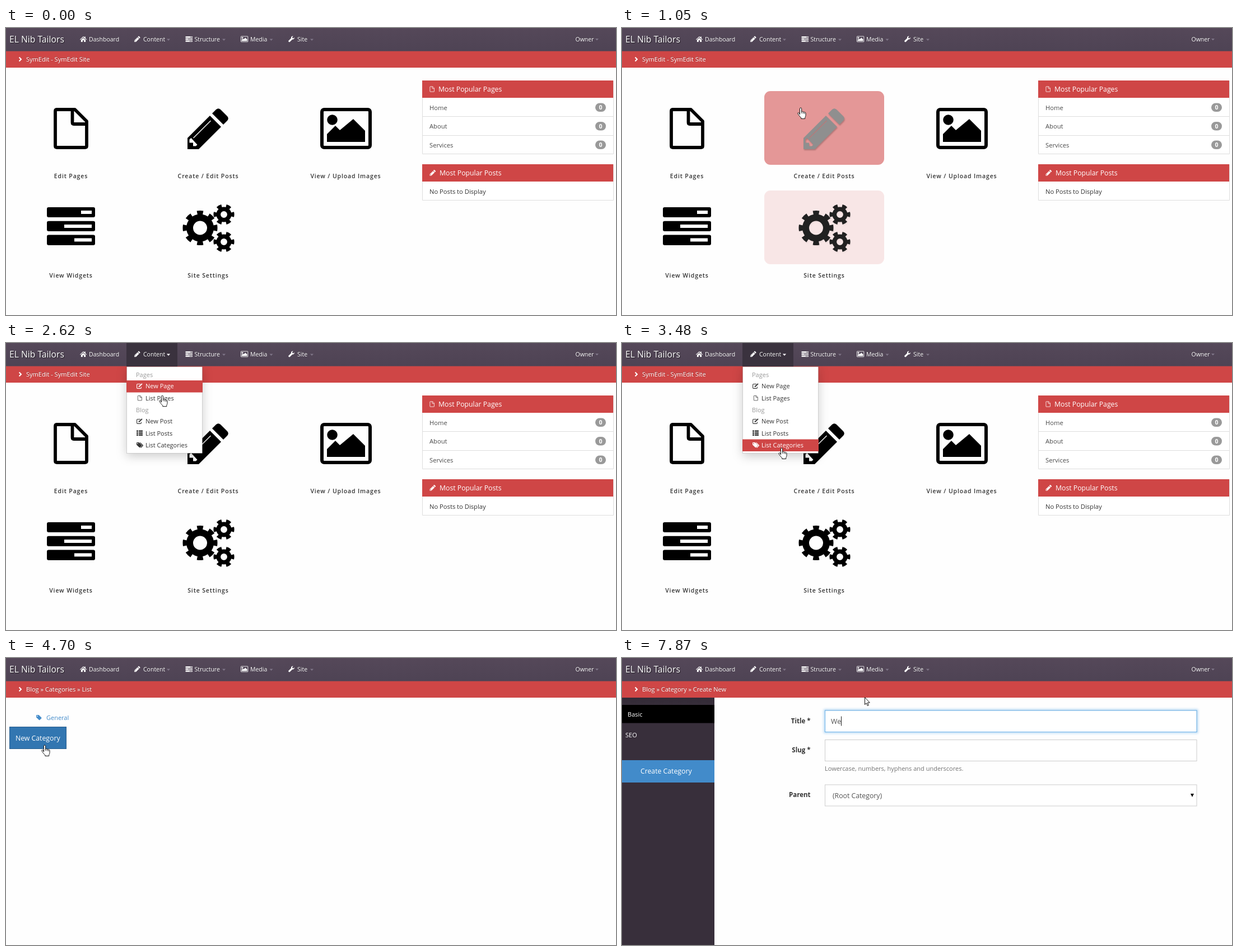
Recreate the animation shown at these times as an HTML page. Size 1089x514 px, loop 8 s.

```html
<!DOCTYPE html>
<html lang="en">
<head>
<meta charset="utf-8">
<title>Dashboard</title>
<style>
@property --h { syntax: '<number>'; inherits: true; initial-value: 0; }
html, body { margin: 0; width: 100%; height: 100%; overflow: hidden; background: #fefefe; }
svg { display: block; width: 1089px; height: 514px; }
text { font: 11px 'Open Sans', sans-serif; fill: currentColor; white-space: pre; }
.ico { fill: currentColor; stroke: none; }
.line { fill: none; stroke: currentColor; stroke-linejoin: round; }
.white { color: #fff; }
.nav text { font-size: 10.5px; }
.nav text, .bar text { text-shadow: 0 -1px 0 rgba(0,0,0,.3); }
.nav .brand { font-size: 15.7px; text-shadow: 1px 1px 1px rgba(0,0,0,.6); }
.big { font-size: 12.25px; }
.row { font-size: 11.2px; fill: #4a4a4a; }
.badge { font-size: 10.5px; font-weight: 700; }
.label { font-size: 10.5px; font-weight: 600; letter-spacing: .87px; fill: #333; text-anchor: middle; }
.field { font-size: 11.5px; font-weight: 700; fill: #333; text-anchor: end; }
.mute { color: #999; }
.box { fill: #fff; stroke: #ccc; }

/* 1% of the loop is 80 ms */
.home, .list, .form, .menu, .hot, .hand, .arrow, .beam, .over, .press, .focus, .caret, .w, .e {
  animation: 8s step-end infinite;
}
.home { animation-name: home; }
.list { animation-name: list; }
.form { animation-name: form; }
.menu { animation-name: menu; }
.hot { animation-name: hot; }
.hand { animation-name: hand; }
.arrow { animation-name: arrow; }
.beam { animation-name: beam; }
.over { animation-name: over; }
.press { animation-name: press; }
.focus { animation-name: focus; }
.caret { animation-name: caret; }
.w { animation-name: w; }
.e { animation-name: e; }
.cursor { animation: move 8s linear infinite; }
.posts { animation: posts 8s linear infinite; }
.settings { animation: settings 8s linear infinite; }
.tile rect.bg { fill: #cf4646; opacity: var(--h); }
.tile .glyph {
  color: color-mix(in srgb, #fff calc(var(--h) * 100%), #000);
  filter: drop-shadow(1px 2px 1px rgb(0 0 0 / calc(var(--h) * .4)));
}
.drop { fill: #fff; stroke: rgba(0,0,0,.15); filter: drop-shadow(0 5px 9px rgba(0,0,0,.2)); }

@keyframes home { 0% { opacity: 1; } 44.25% { opacity: 0; } }
@keyframes list { 0% { opacity: 0; } 44.25% { opacity: 1; } 71.125% { opacity: 0; } }
@keyframes form { 0% { opacity: 0; } 71.125% { opacity: 1; } }
@keyframes menu { 0% { opacity: 0; } 26% { opacity: 1; } 44.25% { opacity: 0; } }
@keyframes hot {
  0% { transform: translateY(-100px); }
  32.375% { transform: translateY(67px); }
  33.25% { transform: translateY(88.5px); }
  34.625% { transform: translateY(-100px); }
  36.125% { transform: translateY(129.5px); }
  37.625% { transform: translateY(151px); }
  39.125% { transform: translateY(172.5px); }
}
@keyframes posts {
  0%, 11.5% { --h: 0; } 13.125% { --h: .56; } 15.25%, 15.625% { --h: 1; }
  18.5% { --h: .13; } 20%, 100% { --h: 0; }
}
@keyframes settings {
  0%, 8.625% { --h: 0; } 10.75% { --h: .68; } 13.125% { --h: .13; } 14.25%, 100% { --h: 0; }
}
@keyframes move {
  0%, 7.625% { transform: translate(326px, 486px); }
  13.125% { transform: translate(319px, 143px); }
  15.625% { transform: translate(312px, 115px); }
  17% { transform: translate(292px, 56px); }
  18.5% { transform: translate(277px, 38px); }
  20% { transform: translate(277px, 20px); }
  20.625%, 29.875% { transform: translate(277px, 24px); }
  32.75% { transform: translate(279px, 94px); }
  39.625% { transform: translate(285px, 188px); }
  52.125% { transform: translate(285px, 188px); animation-timing-function: ease-in-out; }
  58.75% { transform: translate(69px, 156px); }
  71.75% { transform: translate(69px, 156px); animation-timing-function: ease-in-out; }
  79%, 83% { transform: translate(430px, 112px); }
  86%, 100% { transform: translate(433px, 70px); }
}
@keyframes hand {
  0% { opacity: 0; } 8.75% { opacity: 1; } 10.75% { opacity: 0; } 11.5% { opacity: 1; }
  15.7% { opacity: 0; } 18.2% { opacity: 1; } 50.25% { opacity: 0; }
  57% { opacity: 1; } 72.4% { opacity: 0; }
}
@keyframes arrow {
  0% { opacity: 0; } 7.625% { opacity: 1; } 8.75% { opacity: 0; } 10.75% { opacity: 1; }
  11.5% { opacity: 0; } 15.7% { opacity: 1; } 18.2% { opacity: 0; } 50.25% { opacity: 1; }
  57% { opacity: 0; } 72.4% { opacity: 1; } 77.4% { opacity: 0; } 84.5% { opacity: 1; }
}
@keyframes beam { 0% { opacity: 0; } 77.4% { opacity: 1; } 84.5% { opacity: 0; } }
@keyframes over { 0% { opacity: 0; } 57% { opacity: 1; } }
@keyframes press { 0% { opacity: 0; } 67.375% { opacity: 1; } 68% { opacity: 0; } }
@keyframes focus { 0% { opacity: 0; } 82.25% { opacity: 1; } }
@keyframes caret {
  0% { opacity: 0; transform: none; }
  82.25% { opacity: 1; transform: none; }
  88.25% { opacity: 0; transform: none; }
  95.25% { opacity: 1; transform: translateX(11px); }
  98.375% { opacity: 1; transform: translateX(18px); }
}
@keyframes w { 0% { opacity: 0; } 95.25% { opacity: 1; } }
@keyframes e { 0% { opacity: 0; } 98.375% { opacity: 1; } }
</style>
</head>
<body>
<svg viewBox="0 0 1089 514">
<defs>
  <linearGradient id="navFill" x2="0" y2="1"><stop stop-color="#554859"/><stop offset="1" stop-color="#4e4354"/></linearGradient>
  <linearGradient id="sideFill" x2="0" y2="1"><stop stop-color="#332b37"/><stop offset=".04" stop-color="#382f3b"/></linearGradient>
  <clipPath id="row"><rect class="hot" x="215" width="136" height="21.5"/></clipPath>
  <filter id="glow" x="-5%" y="-50%" width="110%" height="200%"><feGaussianBlur stdDeviation="2"/></filter>

  <path id="caretDown" class="ico" d="M0 0h6l-3 3.2z"/>
  <path id="file" class="line" stroke-width="5.8" d="M33.5 3H6Q3 3 3 6V68Q3 71 6 71H56Q59 71 59 68V29H36Q33.5 29 33.5 26ZM33.5 3H38L59 24V29"/>
  <g id="pencil" class="ico">
    <path fill-rule="evenodd" d="M0 53 40 13 60 33 20 73H0ZM12.500 24.500 14.500 26.500 0 0ZM8 67.500 12.300 63 1 52 4 60V62H9V67.500Z" visibility="hidden"/>
    <path fill-rule="evenodd" d="M0 53 40 13 60 33 20 73H0ZM8 67 12 62.500 1 0ZM0 0Z" visibility="hidden"/>
    <path fill-rule="evenodd" d="M0 53 40 13 60 33 20 73H0ZM3.500 55.500V61.500H10V67.500H15L17.500 65 6.500 53ZM10 52.500 11 53.500 42 22.500 41 21.500Z"/>
    <path d="M44 9 51 2Q55-1.500 59 2L71 14Q74.500 18 71 22L64 29Z"/>
  </g>
  <g id="picture">
    <rect class="line" x="3" y="3" width="86" height="68" rx="4" stroke-width="6"/>
    <path class="ico" d="M12 61V47L27 32 35 40 59 20 80 41V61Z"/>
    <circle class="ico" cx="21.5" cy="21.5" r="9.3"/>
  </g>
  <path id="tasks" class="ico" fill-rule="evenodd" d="M3 0H83q3 0 3 3V15q0 3-3 3H3q-3 0-3-3V3q0-3 3-3ZM61 6V12H80V6ZM3 24.7H83q3 0 3 3V40q0 3-3 3H3q-3 0-3-3V27.7q0-3 3-3ZM31 31V37H80V31ZM3 49.5H83q3 0 3 3V65q0 3-3 3H3q-3 0-3-3V52.5q0-3 3-3ZM49 55.5V61.5H80V55.5Z"/>
  <g id="cog" class="line">
    <circle r="9.7" stroke-width="7.6"/>
    <circle r="15.3" stroke-width="6.5" pathLength="12" stroke-dasharray="1 1" stroke-dashoffset=".5"/>
  </g>
  <path id="house" class="ico" d="M0 5.5 6 0 8 1.8V.6H9.800V3.500L12 5.500 11.300 6.300 6 1.600.7 6.300ZM1.900 6.400 6 2.700 10.100 6.400V10H7.200V7H4.800V10H1.900Z"/>
  <path id="wrench" class="ico" d="M.4 8.300 5 3.700C4.600 1.500 6.300-.3 8.700.1L7 1.900 7.300 3.600 9 3.900 10.800 2.200C11.300 4.500 9.300 6.300 7.200 5.900L2.600 10.500C1.300 11.300-.5 9.600.4 8.300Z"/>
  <g id="edit"><path class="line" stroke-width="1.1" d="M7 1.500H2Q.6 1.500.6 3V8Q.6 9.400 2 9.400H7Q8.400 9.400 8.400 8V6.500"/><path class="line" stroke-width="1.9" d="M4 6.500 10 .9"/></g>
  <path id="rows" class="ico" d="M0 0H3V2.500H0ZM4 0H11V2.500H4ZM0 3.500H3V6H0ZM4 3.500H11V6H4ZM0 7H3V9.500H0ZM4 7H11V9.500H4Z"/>
  <path id="tag" class="ico" fill-rule="evenodd" d="M0 1Q0 0 1 0H4.500L9.300 4.800Q9.800 5.400 9.300 6L6.200 9Q5.600 9.500 5 9L0 4.300ZM2 1.200A.9.9 0 1 0 2.100 3 .9.9 0 0 0 2 1.200Z"/>
  <path id="chevron" class="line" stroke-width="2" d="M1 .5 4.500 4 1 7.500" style="stroke-linejoin:miter"/>

  <g id="items">
    <use href="#edit" x="233" y="72"/><text x="249" y="81">New Page</text>
    <use href="#file" transform="translate(235 94)scale(.125)"/><text x="249" y="103">List Pages</text>
    <use href="#edit" x="233" y="135"/><text x="249" y="144">New Post</text>
    <use href="#rows" x="233" y="156.5"/><text x="249" y="165.5">List Posts</text>
    <use href="#tag" x="233" y="178"/><path class="line" stroke-width="1.3" d="M239.5 178.400 244.400 183.500 240.500 187.500"/><text x="249" y="187">List Categories</text>
  </g>
</defs>

<rect width="1089" height="514" fill="#fefefe"/>
<rect y="41" width="1089" height="30" fill="#cf4646"/>

<g class="home">
  <g class="bar white"><text x="36" y="60">SymEdit - SymEdit Site</text></g>
  <use href="#file" x="85" y="143"/>
  <use href="#picture" x="561" y="143"/>
  <use href="#tasks" x="73" y="321"/>
  <g class="tile posts">
    <rect class="bg" x="254" y="113" width="214" height="132" rx="11"/>
    <g class="glyph"><use href="#pencil" x="324" y="144"/></g>
  </g>
  <g class="tile settings">
    <rect class="bg" x="254" y="291" width="214" height="132" rx="11"/>
    <g class="glyph">
      <g class="line" transform="translate(346.5 358)">
        <circle r="18.5" stroke-width="12"/>
        <circle r="27" stroke-width="8" pathLength="16" stroke-dasharray="1 1" stroke-dashoffset=".5"/>
      </g>
      <use href="#cog" x="389" y="334"/><use href="#cog" x="389" y="383"/>
    </g>
  </g>
  <text class="label" x="116" y="268.5">Edit Pages</text>
  <text class="label" x="361" y="268.5">Create / Edit Posts</text>
  <text class="label" x="606.5" y="268.5">View / Upload Images</text>
  <text class="label" x="116" y="446.5">View Widgets</text>
  <text class="label" x="361" y="446.5">Site Settings</text>

  <path fill="#fff" stroke="#ddd" d="M743.5 94.5H1084.5V225.5H743.5ZM743.5 158.5H1084.5M743.5 192.5H1084.5M743.5 244.5H1084.5V308.5H743.5Z"/>
  <path fill="#cf4646" d="M743 94H1084V125H743ZM743 244H1084V275H743Z"/>
  <g class="white">
    <use href="#file" transform="translate(756.5 104.5)scale(.135)"/><text class="big" x="772" y="114">Most Popular Pages</text>
    <use href="#pencil" transform="translate(756.5 254)scale(.145)"/><text class="big" x="774" y="263.5">Most Popular Posts</text>
  </g>
  <text class="row" x="756" y="146.5">Home</text>
  <text class="row" x="756" y="180">About</text>
  <text class="row" x="756" y="213.5">Services</text>
  <text class="row" x="756" y="297" style="fill:#333">No Posts to Display</text>
  <g fill="#999">
    <rect x="1052" y="134.5" width="19" height="15.5" rx="7.7"/>
    <rect x="1052" y="168" width="19" height="15.5" rx="7.7"/>
    <rect x="1052" y="201.5" width="19" height="15.5" rx="7.7"/>
  </g>
  <g class="white" text-anchor="middle">
    <text class="badge" x="1061.5" y="146">0</text>
    <text class="badge" x="1061.5" y="179.5">0</text>
    <text class="badge" x="1061.5" y="213">0</text>
  </g>
</g>

<g class="list">
  <g class="bar white"><text x="36" y="60">Blog » Categories » List</text></g>
  <g color="#428bca"><use href="#tag" x="54" y="102"/><text x="72" y="110.5">General</text></g>
  <rect x="6.5" y="123.5" width="101" height="39" fill="#428bca" stroke="#357ebd"/>
  <rect class="over" x="6.5" y="123.5" width="101" height="39" fill="#3276b1" stroke="#285e8e"/>
  <path class="press" d="M8 162V125H107" fill="none" stroke="#000" stroke-opacity=".2" stroke-width="3"/>
  <g class="white"><text class="big" x="17" y="147.5">New Category</text></g>
</g>

<g class="form">
  <g class="bar white"><text x="36" y="60">Blog » Category » Create New</text></g>
  <rect y="71" width="165" height="443" fill="url(#sideFill)"/>
  <rect y="84" width="165" height="32.5"/>
  <rect y="183" width="165" height="40" fill="#428bca"/>
  <g class="white">
    <text x="10" y="104.5">Basic</text>
    <text x="6" y="141.5">SEO</text>
    <text class="big" x="33" y="207">Create Category</text>
  </g>
  <text class="field" x="336.5" y="116.5">Title *</text>
  <text class="field" x="336.5" y="168.5">Slug *</text>
  <text class="field" x="336.5" y="249">Parent</text>
  <rect class="box" x="362.5" y="94" width="663.5" height="38.5"/>
  <rect class="box" x="362.5" y="146.5" width="663.5" height="38"/>
  <rect class="box" x="362.5" y="227" width="663.5" height="38"/>
  <g color="#737373"><text x="362" y="201.5">Lowercase, numbers, hyphens and underscores.</text></g>
  <g color="#555"><text class="big" x="376" y="251">(Root Category)</text></g>
  <path d="M1015 243H1021L1018 249Z"/>
  <g class="focus">
    <rect x="362" y="93.5" width="664.5" height="39.5" fill="none" stroke="#66afe9" stroke-width="3" opacity=".6" filter="url(#glow)"/>
    <rect class="box" x="362.5" y="94" width="663.5" height="38.5" style="stroke:#66afe9"/>
  </g>
  <g color="#555">
    <text class="big w" x="373" y="118">W</text>
    <text class="big e" x="384.3" y="118">e</text>
  </g>
  <rect class="caret" x="373" y="104.5" width="1" height="17" fill="#222"/>
</g>

<rect class="menu drop" x="215.5" y="42.5" width="135" height="155"/>

<rect width="1089" height="41.5" fill="url(#navFill)"/>
<rect class="menu" x="215" width="91" height="42" fill="#3a323e"/>
<g class="nav white">
  <text class="brand" x="6" y="25.5">EL Nib Tailors</text>
  <use href="#house" x="132" y="15"/><text x="148" y="24">Dashboard</text>
  <use href="#pencil" transform="translate(229 14.5)scale(.145)"/><text x="245" y="24">Content</text>
  <use href="#tasks" transform="translate(320.5 15)scale(.144)"/><text x="336.5" y="24">Structure</text>
  <use href="#picture" transform="translate(419 14.5)scale(.144)"/><text x="436" y="24">Media</text>
  <use href="#wrench" x="504" y="14.5"/><text x="520" y="24">Site</text>
  <text x="1016.5" y="23.5">Owner</text>
  <use href="#chevron" x="22.5" y="52"/>
</g>
<g color="#80778a">
  <use href="#caretDown" x="287" y="19.5"/><use href="#caretDown" x="386" y="19.5"/>
  <use href="#caretDown" x="470.5" y="19.5"/><use href="#caretDown" x="543" y="19.5"/>
  <use href="#caretDown" x="1052" y="19"/>
</g>

<g class="menu">
  <use href="#caretDown" x="287" y="19.5" color="#fff"/>
  <g class="mute"><text x="232" y="61">Pages</text><text x="232" y="123.5">Blog</text></g>
  <use href="#items" color="#333"/>
  <g clip-path="url(#row)">
    <rect x="215" y="42" width="136" height="156" fill="#cf4646"/>
    <use href="#items" color="#fff"/>
  </g>
</g>

<g class="cursor" fill="#fff" stroke="#111" stroke-linejoin="round">
  <g class="hand">
    <path d="M-1.6 12V1.7a1.6 1.6 0 0 1 3.2 0V7c1-.8 2.4-.5 2.7.5 1-.6 2.2-.2 2.5.7 1.200-.4 2.200.3 2.200 1.500V13.500c0 2-1 2.800-1.300 4V19.500H.8V17.800C-1.500 16-3.500 13-4.900 10.700c-.9-1.600 1-2.700 2.100-1.500z"/>
    <path d="M1.6 7V10M4.3 7.8V10.5M6.8 8.5V11" fill="none" stroke-width=".9"/>
  </g>
  <path class="arrow" d="M.5.5V13.5L3.3 10.8 5.3 15.5 7.3 14.6 5.3 10H9.3Z"/>
  <path class="beam" d="M-3-8H-1Q0-8 0-7V7Q0 8-1 8H-3M3-8H1Q0-8 0-7M0 7Q0 8 1 8H3" fill="none"/>
</g>
</svg>
</body>
</html>
```
